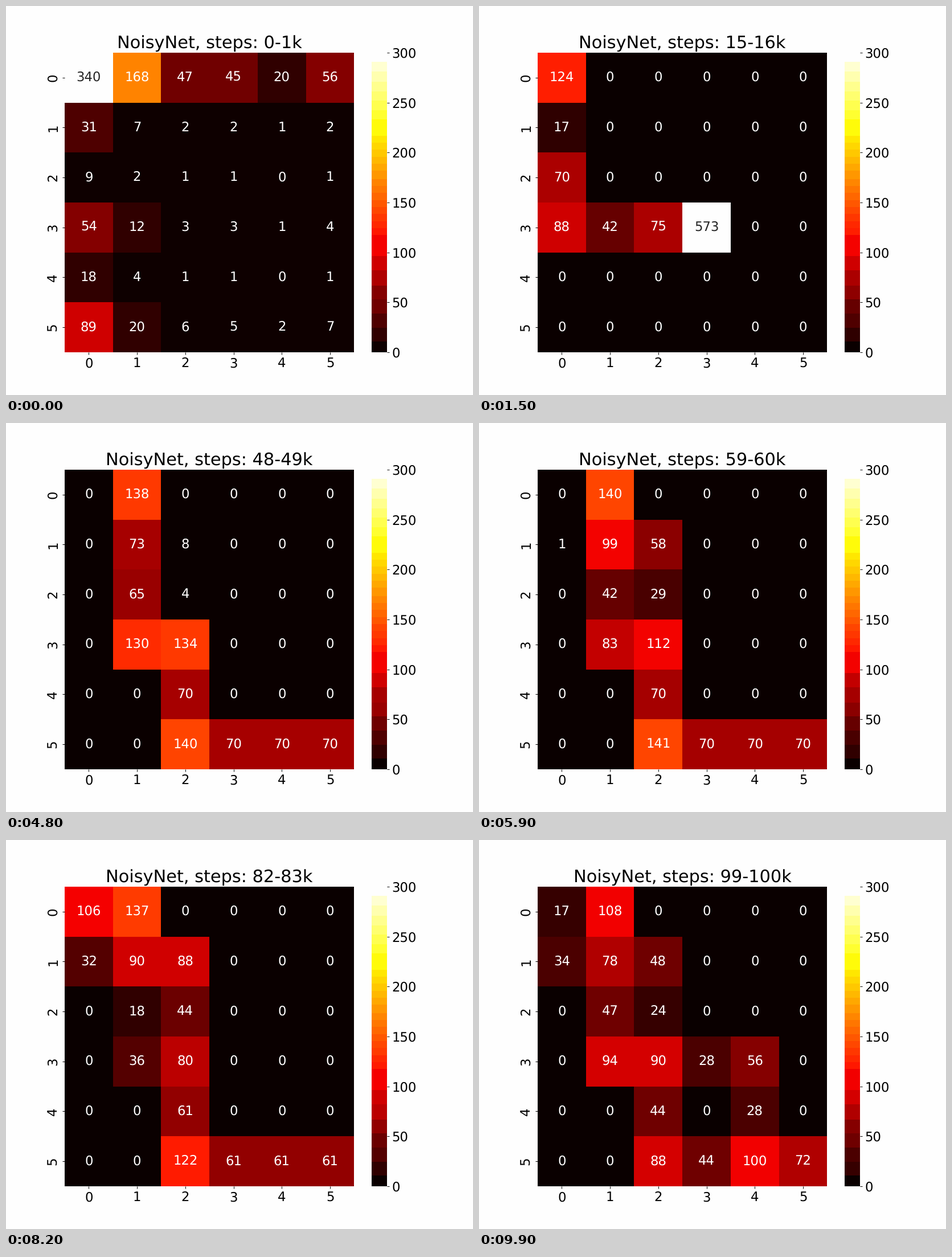
These frames come from a looping animation (820 by 683 pixels, 10 s). A matplotlib script:

```python
import numpy as np
import matplotlib.pyplot as plt
from matplotlib.animation import FuncAnimation

N, VMAX, FRAMES = 6, 300, 100
W, H = 820, 683
BASE_W, BASE_H = 900, 750  # layout grid, scaled down to the stage
DPI = 100 * W / BASE_W


def wander(row, col):
    """Random walk that hugs the first row and column."""
    grid = 0.45 * np.outer(col, row) / row[0]
    grid[0], grid[:, 0] = row, col
    return grid


def stuck(row, col):
    """Down the first column, then along the row where the column ends."""
    grid = np.zeros((N, N))
    grid[:len(col), 0] = col
    grid[len(col) - 1, :len(row)] = row
    return grid


def shuttle(first, second, side):
    """Back and forth over two columns, with one side cell."""
    grid = np.zeros((N, N))
    grid[:len(first), 0] = first
    grid[:len(second), 1] = second
    grid[4, 2] = side
    return grid


def routes(start, goal, left=0, down=0, up=0, idle=0):
    """Visits when walks from the top row split over a few paths."""
    top, mid, low = start - left, start - down, goal - up
    return np.array([
        [left + 2 * idle, 2 * top + idle, 0, 0, 0, 0],
        [2 * left, top + mid, 2 * mid, 0, 0, 0],
        [0, down, mid, 0, 0, 0],
        [0, 2 * down, down + start - up, up, 2 * up, 0],
        [0, 0, low, 0, up, 0],
        [0, 0, 2 * low, low, low + 2 * up, goal]])


stages = {
    0: wander([340, 168, 47, 45, 20, 56], [340, 31, 9, 54, 18, 89]),
    15: stuck([88, 42, 75, 573], [124, 17, 70, 88]),
    29: shuttle([8, 3, 7, 340, 13], [259, 3, 275, 6, 1], 80),
    48: routes(69, 70, down=65),
    70: routes(72, 71, left=1, down=18),
    82: routes(62, 61, left=16, down=18, idle=45),
    99: routes(71, 72, left=17, down=47, up=28),
}
steps, grids = list(stages), list(stages.values())


def counts(step):
    k = min(np.searchsorted(steps, step, side="right") - 1, len(steps) - 2)
    t = (step - steps[k]) / (steps[k + 1] - steps[k])
    return np.rint(grids[k] + t * (grids[k + 1] - grids[k])).astype(int)


hot = plt.get_cmap("hot")
bar_rgb = hot(np.arange(256), bytes=True)[:, :3]
page = np.full((1, 3), 254.5)
# pixel areas of a cell, a bar slice and the page
areas = np.repeat([7424.0, 54.6, 250000.0], [N * N, 256, 1])


def banded(cells):
    """Reduce cell and bar colours to the mean of each coarse RGB bin."""
    rgb = np.vstack([cells, bar_rgb, page])
    r, g, b = rgb.astype(int).T
    _, bins = np.unique((r >> 5) * 128 + (g >> 4) * 8 + (b >> 5),
                        return_inverse=True)
    bins = bins.ravel()
    total = np.bincount(bins, areas)
    mean = np.stack([np.bincount(bins, areas * c) / total for c in rgb.T], 1)
    out = np.floor(mean + 1e-6)[bins] / 255
    return out[:N * N].reshape(N, N, 3), out[N * N:-1].reshape(256, 1, 3)


def luminance(rgb):
    c = rgb / 255
    lin = np.where(c <= 0.03928, c / 12.92, ((c + 0.055) / 1.055) ** 2.4)
    return lin @ [0.2126, 0.7152, 0.0722]


plt.rcParams.update({"font.family": "DejaVu Sans", "font.size": 18,
                     "xtick.labelsize": 18, "ytick.labelsize": 18,
                     "text.hinting": "none"})
fig = plt.figure(figsize=((W + 0.01) / DPI, (H + 0.01) / DPI), dpi=DPI,
                 facecolor="#fefefe")


def add_panel(x0, x1, top=90, bottom=667.5):
    panel = fig.add_axes([x0 / BASE_W, 1 - bottom / BASE_H,
                          (x1 - x0) / BASE_W, (bottom - top) / BASE_H])
    panel.spines[:].set_visible(False)
    panel.set_facecolor("none")
    return panel


ax, cax = add_panel(113, 671), add_panel(705, 734)

edges = np.arange(N + 1)
mesh = ax.pcolormesh(edges, edges, np.zeros((N, N, 3)), linewidth=0)
ax.set(xlim=(0, N), ylim=(N, 0))
ax.set_xticks(edges[:-1] + 0.5, edges[:-1])
ax.set_yticks(edges[:-1] + 0.5, edges[:-1], rotation=90, va="center")
title = ax.set_title("", fontsize=24, pad=6, y=1.0)
labels = [ax.text(c + 0.5, r + 0.5, "", ha="center", va="center")
          for r in range(N) for c in range(N)]

bar = cax.pcolormesh([0, 1], np.linspace(0, VMAX, 257),
                     np.zeros((256, 1, 3)), linewidth=0)
cax.set(xlim=(0, 1), ylim=(0, VMAX), xticks=[])
cax.yaxis.tick_right()
cax.set_yticks(range(0, VMAX + 1, 50))


def update(step):
    values = counts(step).ravel()
    cells = hot(values / VMAX, bytes=True)[:, :3]
    cell_rgb, bands = banded(cells)
    mesh.set_array(cell_rgb)
    bar.set_array(bands)
    title.set_text(f"NoisyNet, steps: {step}-{step + 1}k")
    for label, value, lum in zip(labels, values, luminance(cells)):
        label.set_text(str(value))
        label.set_color("0.15" if lum > 0.408 else "#fefefe")
    return [mesh, bar, title, *labels]


anim = FuncAnimation(fig, update, frames=FRAMES, interval=100,
                     repeat=True, repeat_delay=0, blit=False)
plt.show()
```
